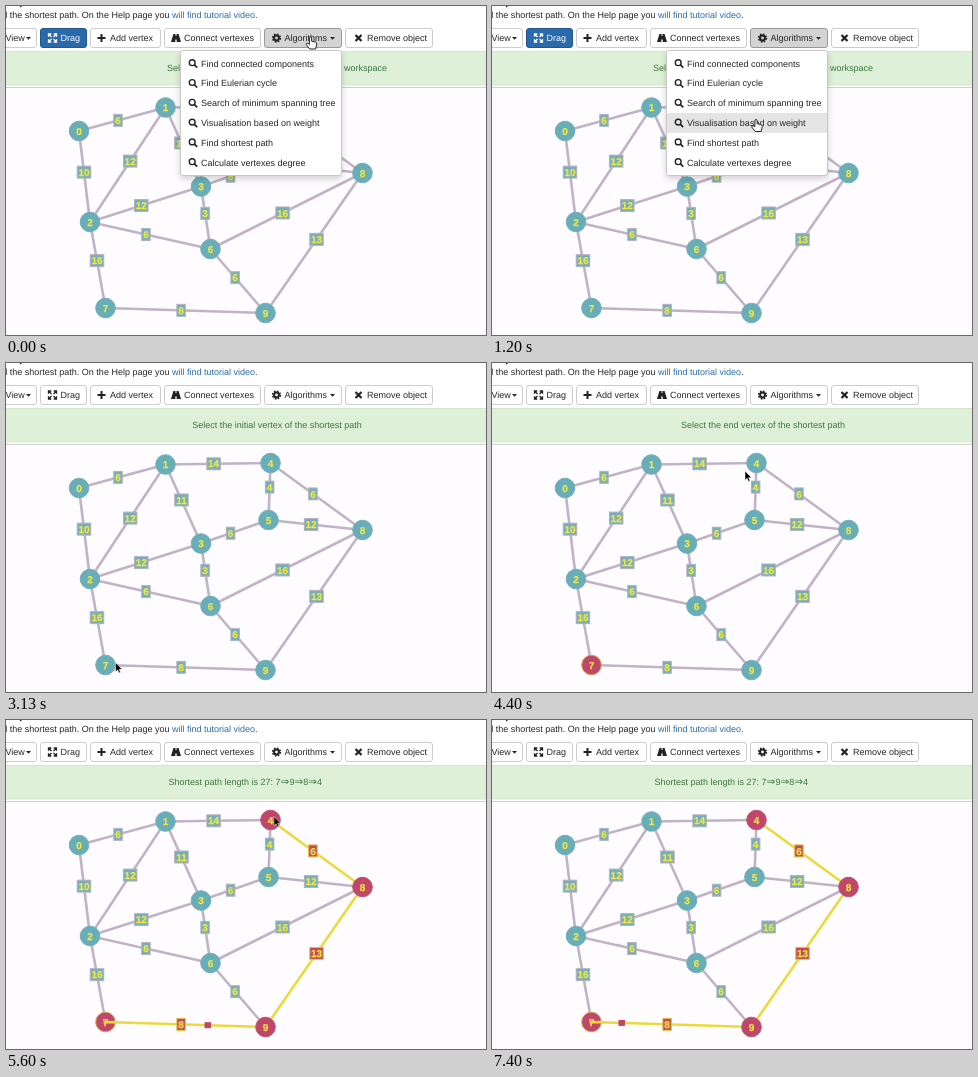
Animation, 480 px wide and 329 px high, one loop 7.47 s. Source, as an HTML page:

```html
<!DOCTYPE html>
<html lang="en">
<head>
<meta charset="utf-8">
<style>
html, body { margin: 0; width: 100%; height: 100%; overflow: hidden; background: #fff }
svg { display: block; font: 9px "Liberation Sans", Arial, sans-serif; fill: #262626; text-rendering: geometricPrecision }
.btn rect { fill: #fff; stroke: #ccc }
.icon { fill: none; stroke: #222; stroke-width: 1.7 }
.solid { fill: #222; stroke: none }
.link { fill: #2a6bae }
#msg { fill: #3c763d; text-anchor: middle }
.to { font: 10.5px "DejaVu Sans", sans-serif }
#graph text { font-weight: bold; font-size: 10px; fill: #f0e83c; stroke: #f0e83c; stroke-width: .25; text-anchor: middle }
.edge { stroke: #c0b3c6; stroke-width: 2.6 }
.tag { fill: #78aebb; stroke: #b3b1c3 }
.node { fill: #68aeb9; stroke: #78adb9 }
#stub, #dot, #menu { display: none }
#dot { fill: #c0466c }
#stub, .s3 .on .edge { stroke: #ecda3c; stroke-width: 2.6 }
.s3 .on .tag { fill: #c24a5c; stroke: #e3c23f }
.s2 #v7 .node { fill: #c0466c; stroke: #cfa54a }
.s3 .on .node { fill: #c0466c; stroke: #b8566f }
.s3 #stub, .s3 #dot, .s0 #menu { display: inline }
#panel { fill: #fff; stroke: #c8c8c8; filter: drop-shadow(0 3px 3px rgba(0, 0, 0, .17)) }
.s0 #Drag rect { fill: #2a69ab; stroke: #22568e }
.s0 #Drag text { fill: #fff }
.s0 #Drag .icon { stroke: #fff }
.s0 #Algorithms rect { fill: #d4d4d4; stroke: #9a9a9a }
</style>
</head>
<body>
<svg id="stage" width="480" height="329" viewBox="0 0 480 329"></svg>
<script>
const LOOP = 7470, MENU_END = 2670, FIRST_PICK = 3400, SECOND_PICK = 5105, SPEED = 0.2067;
const stage = document.getElementById('stage');
const $ = id => document.getElementById(id);

const icons = {
  expand: '<path class="icon" style="stroke-width:1.3" d="M-1-1L-4-4M1-1L4-4M-1 1L-4 4M1 1L4 4M-4-1.2V-4H-1.2M1.2-4H4V-1.2M4 1.2V4H1.2M-1.2 4H-4V1.2"/>',
  plus: '<path class="icon" style="stroke-width:2" d="M-4 0H4M0-4V4"/>',
  road: '<path class="solid" d="M-2.6-4H-.5V-2H.5V-4H2.6L5 4H.7V1.5H-.7V4H-5z"/>',
  cog: '<circle class="icon" r="2.4" style="stroke-width:2"/><circle class="icon" r="3.8" stroke-dasharray="1.6 1.38"/>',
  cross: '<path class="icon" style="stroke-width:2.2" d="M-3-3L3 3M3-3L-3 3"/>',
  search: '<circle class="icon" cx="-.8" cy="-.8" r="2.9" style="stroke-width:1.4"/><path class="icon" d="M1.2 1.2L4.2 4.2"/>'
};
const icon = (name, x, y) => `<g transform="translate(${x} ${y})">${icons[name]}</g>`;
const caret = x => `<path d="M${x} 31h5l-2.5 2.7z"/>`;
const button = (x, right, label, textX, art) =>
  `<g class="btn" id="${label.split(' ')[0]}"><rect x="${x + .5}" y="22.5" width="${right - x - 1}" height="19" rx="2.5"/>` +
  `${art}<text x="${textX}" y="35">${label}</text></g>`;

const nodes = [[73, 125], [159.5, 101.5], [84, 216], [195, 180.5], [264.5, 100],
  [262.5, 157], [204.5, 243], [99.5, 302], [356.5, 167], [259.5, 307]];
const edges = [[0, 1, 6], [0, 2, 10], [1, 2, 12], [2, 3, 12], [2, 6, 6], [2, 7, 16],
  [3, 6, 3], [3, 5, 6], [1, 3, 11], [1, 4, 14], [4, 5, 4], [4, 8, 6], [5, 8, 12],
  [6, 8, 16], [6, 9, 6], [7, 9, 8], [8, 9, 13]];
const route = [7, 9, 8, 4];
const legs = route.slice(1).map((n, i) => {
  const a = nodes[route[i]], b = nodes[n];
  return { a, b, length: Math.hypot(b[0] - a[0], b[1] - a[1]) };
});
const routeLength = legs.reduce((sum, leg) => sum + leg.length, 0);
const onRoute = (a, b) => Math.abs(route.indexOf(a) - route.indexOf(b)) === 1 &&
  route.includes(a) && route.includes(b) ? 'on' : '';

// Weight tags sit slightly before the middle of their edge.
function edge([a, b, weight]) {
  const [x1, y1] = nodes[a], [x2, y2] = nodes[b];
  const k = .5 - 4.4 / Math.hypot(x2 - x1, y2 - y1);
  const x = x1 + (x2 - x1) * k, y = y1 + (y2 - y1) * k, w = weight > 9 ? 13.5 : 8.5;
  return `<g class="${onRoute(a, b)}"><line class="edge" x1="${x1}" y1="${y1}" x2="${x2}" y2="${y2}"/>` +
    `<rect class="tag" x="${x - w / 2}" y="${y - 6}" width="${w}" height="12"/>` +
    `<text x="${x}" y="${y + 3.6}">${weight}</text></g>`;
}
const node = ([x, y], i) =>
  `<g id="v${i}" class="${route.includes(i) ? 'on' : ''}"><circle class="node" cx="${x}" cy="${y}" r="9.8"/>` +
  `<text x="${x}" y="${y + 3.6}">${i}</text></g>`;

const ROW = 19.8, MENU_TOP = 47.6;
const items = ['Find connected components', 'Find Eulerian cycle', 'Search of minimum spanning tree',
  'Visualisation based on weight', 'Find shortest path', 'Calculate vertexes degree'];
const item = (label, i) => {
  const y = MENU_TOP + ROW * (i + .5);
  return icon('search', 187, y) + `<text x="195" y="${y + 3}">${label}</text>`;
};

stage.innerHTML = `
<rect width="480" height="329" fill="#fff"/>
<rect x="14" width="1.5" height="1.2"/>
<text x="251.5" y="12" text-anchor="end">find the shortest path. On the Help page you <tspan class="link">will find tutorial video</tspan>.</text>
${button(-20, 31, 'View', -.5, caret(20))}
${button(34, 81, 'Drag', 54.5, icon('expand', 46.5, 32))}
${button(84, 155, 'Add vertex', 104, icon('plus', 95.5, 32))}
${button(158, 255, 'Connect vertexes', 178, icon('road', 170, 32))}
${button(258, 336, 'Algorithms', 278.5, icon('cog', 270.5, 32) + caret(324))}
${button(339, 427, 'Remove object', 361, icon('cross', 352.5, 32))}
<rect x="-2" y="45.5" width="484" height="33.5" fill="#dff0d8" stroke="#d6e9c6"/>
<text id="msg" y="65"></text>
<rect y="82" width="480" height="247" fill="#fefcff"/>
<rect y="81" width="480" height="1" fill="#d0d0d0"/>
<g id="graph">${edges.map(edge).join('')}${nodes.map(node).join('')}
<path id="stub" d="M97.5 302.2H112"/><rect id="dot" width="6.5" height="6"/></g>
<g id="menu">
<rect id="panel" x="174.5" y="44.5" width="161" height="125" rx="2.5"/>
<rect id="hover" x="175" width="160" height="${ROW}" fill="#e4e4e4"/>
${items.map(item).join('')}</g>
<path id="hand" fill="#fff" stroke="#111" stroke-width=".9" d="M-1.1 .6Q0-.8 1.1 .6V4.2L4.8 5Q6.4 5.4 6.2 7L5.2 12H-.8L-4.2 7.6Q-4.6 5.8-2.8 6.2L-1.1 7.4z"/>
<path id="arrow" fill="#000" stroke="#fff" stroke-width=".5" d="M0 0V9.2L2.1 7.3L3.5 10.4L5 9.7L3.6 6.7H6.5z"/>`;

const messages = [
  ['Select and move objects by mouse or move workspace', 271],
  ['Select the initial vertex of the shortest path', 271],
  ['Select the end vertex of the shortest path', 271],
  ['Shortest path length is 27: ' + route.join('<tspan class="to">⇒</tspan>'), 239.3]
];

// Pointer stops: time, x, y.
const stops = [[0, 304.5, 31], [300, 304.5, 31], [1150, 264, 113.5], [1700, 264, 113.5],
  [2400, 255, 133.5], [MENU_END, 255, 133.5], [3100, 107, 302.5], [3500, 107, 302.5],
  [4400, 253, 108], [4750, 268, 96.5], [6200, 268, 96.5], [7000, 300, 345], [LOOP, 300, 345]];

function pointer(t) {
  const i = stops.findIndex(s => s[0] > t), [t0, x0, y0] = stops[i - 1], [t1, x1, y1] = stops[i];
  const u = (t - t0) / (t1 - t0), e = u * u * (3 - 2 * u);
  return [x0 + (x1 - x0) * e, y0 + (y1 - y0) * e];
}

function marker(distance) {
  for (const { a, b, length } of legs) {
    if (distance < length) return a.map((v, i) => v + (b[i] - v) * distance / length);
    distance -= length;
  }
  return nodes[4];
}

let shown = -1;
function showStep(step) {
  if (step === shown) return;
  shown = step;
  stage.setAttribute('class', 's' + step + (step === 3 ? ' s2' : ''));
  const [text, center] = messages[step];
  $('msg').innerHTML = text;
  $('msg').setAttribute('x', center);
}

function draw(now) {
  const t = Math.floor((now % LOOP) * .015 + .02) / .015;
  const step = (t >= MENU_END) + (t >= FIRST_PICK) + (t >= SECOND_PICK);
  const [x, y] = pointer(t);
  showStep(step);

  const row = Math.floor((y - MENU_TOP) / ROW);
  $('hover').setAttribute('y', MENU_TOP + ROW * Math.max(row, 0));
  $('hover').style.opacity = row < 0 ? 0 : 1;
  for (const id of ['hand', 'arrow']) {
    $(id).setAttribute('transform', `translate(${x} ${y})`);
    $(id).style.display = (id === 'hand') === (step === 0) ? 'inline' : 'none';
  }
  if (step === 3) {
    const [mx, my] = marker((t - SECOND_PICK) * SPEED % routeLength);
    $('dot').setAttribute('x', mx - 3.2);
    $('dot').setAttribute('y', my - 3);
  }
}

const start = performance.now();
function frame() {
  draw(performance.now() - start);
  requestAnimationFrame(frame);
}
frame();
</script>
</body>
</html>
```
